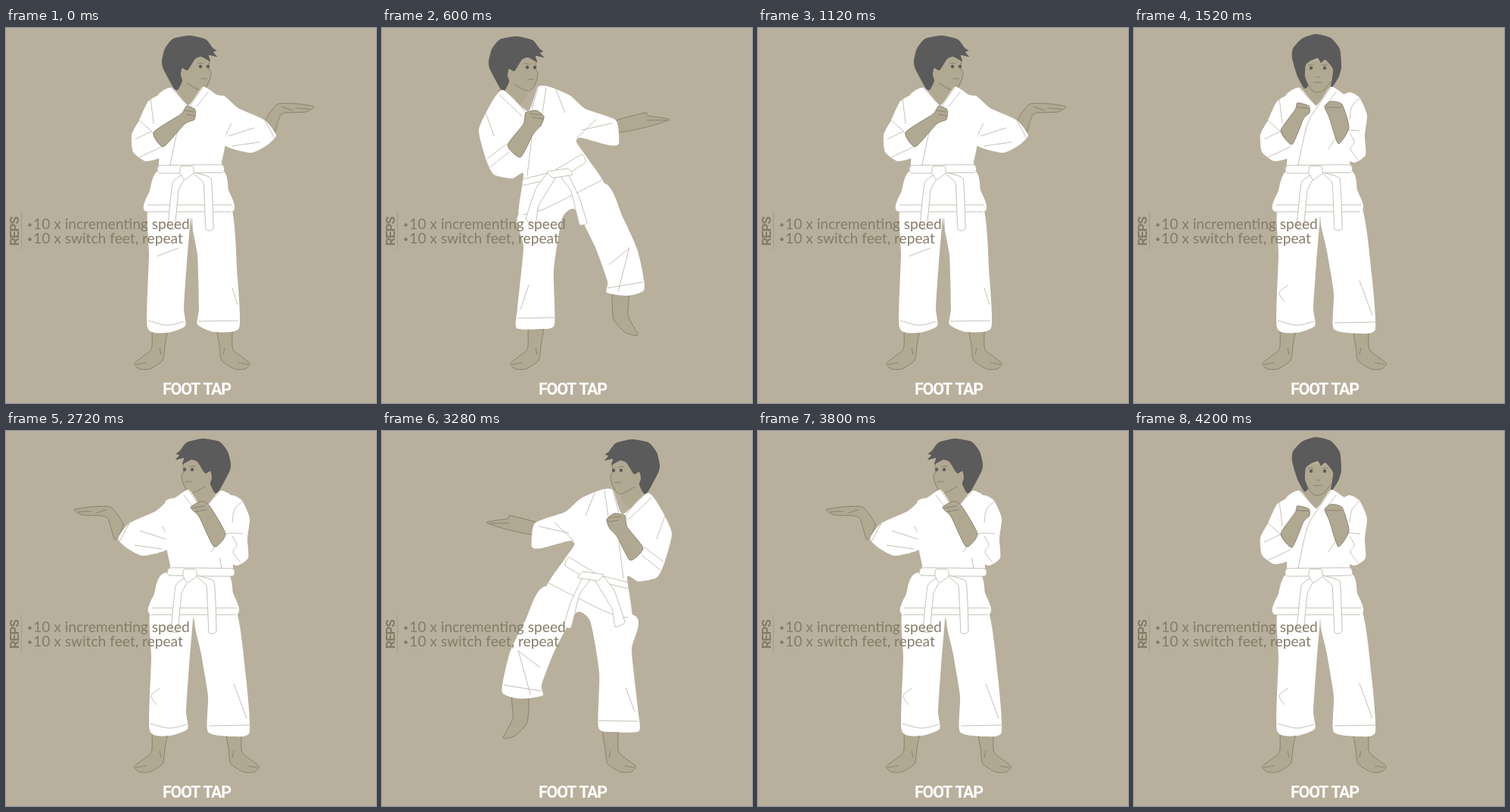
An HTML page with a canvas that plays this animation: 489 by 496 pixels, repeating every 5.64 s.

```html
<!DOCTYPE html>
<html lang="en">
<head>
<meta charset="utf-8">
<title>Foot tap</title>
<style>
html, body { margin: 0; width: 100%; height: 100%; overflow: hidden; background: #b8b09c; }
canvas { display: block; }
</style>
</head>
<body>
<canvas id="stage" width="489" height="496"></canvas>
<script>
const ctx = document.getElementById('stage').getContext('2d');
const BG = '#b8b09c', SKIN = '#b1a892', INK = '#857c69', FOLD = '#bdb8ac', HAIR = '#5c5b5b', TEXT = '#857c68';
const LOOP = 5640;

function toPoints(s) {
  const n = s.split(' ').map(Number), pts = [];
  for (let i = 0; i < n.length; i += 2) pts.push([n[i], n[i + 1]]);
  return pts;
}

// Gently rounded curve through the points
function curve(s, closed, tight) {
  const p = toPoints(s), n = p.length, path = new Path2D();
  const at = i => closed ? p[(i + n) % n] : p[Math.max(0, Math.min(n - 1, i))];
  path.moveTo(...p[0]);
  for (let i = 0; i < (closed ? n : n - 1); i++) {
    const a = at(i - 1), b = at(i), c = at(i + 1), d = at(i + 2);
    path.bezierCurveTo(b[0] + (c[0] - a[0]) / tight, b[1] + (c[1] - a[1]) / tight,
      c[0] - (d[0] - b[0]) / tight, c[1] - (d[1] - b[1]) / tight, c[0], c[1]);
  }
  if (closed) path.closePath();
  return path;
}

const area = (fill, stroke, tight = 10) => s => {
  const path = curve(s, true, tight);
  return () => {
    ctx.fillStyle = fill;
    ctx.fill(path);
    if (stroke) { ctx.strokeStyle = stroke; ctx.stroke(path); }
  };
};
const lines = color => (...list) => {
  const paths = list.map(s => curve(s, false, 6));
  return () => { ctx.strokeStyle = color; paths.forEach(p => ctx.stroke(p)); };
};
const skin = area(SKIN, INK), bare = area(SKIN), cloth = area('#fff'),
  band = area('#fff', FOLD, 20), hair = area(HAIR), fold = lines(FOLD), ink = lines(INK);
const eyes = s => () => {
  ctx.fillStyle = HAIR;
  toPoints(s).forEach(([x, y]) => {
    ctx.beginPath();
    ctx.arc(x, y, 2.2, 0, 7);
    ctx.fill();
  });
};

const place = (dx, dy, sx, part) => () => {
  ctx.save();
  ctx.translate(dx, dy);
  ctx.scale(sx, 1);
  part();
  ctx.restore();
};
const move = (dx, part) => place(dx, 0, 1, part);
const mirror = (sum, part) => place(sum, 0, -1, part);
const group = (...parts) => () => parts.forEach(p => p());

const profile = group(
  bare('232 60 256 80 256 90 241 104 219 82'),
  bare('236 42 268 38 269 53 271 59 268 74 257 82 246 79 233 64'),
  ink('269 42 268 53 271 59 269 69 263 80 256 82 239 73', '257 67 266 67', '253 46 261 47'),
  eyes('257 51 267 51'),
  hair('222 80 214 66 207 52 206 43 210 27 221 14 243 10 264 15 273 26 278 30 274 32 279 38 268 36 270 44 258 38 250 41 240 56 233 53 231 62 233 70 227 82'));
const frontHead = group(
  bare('225 72 261 72 262 82 241 104 219 82'),
  bare('226 46 262 46 261 66 252 81 243 85 235 82 227 70'),
  ink('227 70 235 82 243 85 252 81 260 70', '237 72 249 72', '241 65 246 65', '230 49 238 49', '248 49 256 49'),
  eyes('234 53 252 53'),
  hair('225 80 216 64 209 40 210 27 222 14 240 8 260 13 272 28 274 52 270 66 260 80 263 55 253 42 247 46 243 40 234 43 227 49 226 64 230 76'));

const foot = group(
  skin('194 396 192 425 170 443 176 451 190 451 207 440 210 420 213 396'),
  ink('203 423 205 432', '172 445 185 443'));
const hangingFoot = skin('305 350 306 385 322 403 338 406 325 380 326 350');

const legL = group(
  cloth('191 236 191 300 189 396 215 403 239 394 237 370 241 310 246 250 246 236'),
  fold('190 387 215 393 238 388'));
const knee = fold('204 340 192 350 199 362');
const legR = group(
  cloth('246 240 255 295 264 350 264 398 298 404 319 398 314 325 300 236'),
  fold('265 390 319 389', '298 334 315 380', '246 250 247 280'));
const legNarrow = group(
  cloth('245 240 253 300 255 370 253 392 275 402 308 397 306 330 297 236'),
  fold('254 388 307 387', '299 344 306 366', '199 302 228 291', '246 252 247 280'));

const skirt = group(
  cloth('203 188 190 215 186 243 298 243 294 214 285 188'),
  fold('187 234 299 234', '186 243 298 243'));
const chest = group(
  cloth('219 79 200 90 198 130 204 150 202 180 206 190 285 190 285 178 290 152 292 95 278 88 260 78 241 102'),
  fold('260 79 244 102 229 128 217 181', '219 80 241 103', '267 85 252 104'));
const waist = band('203 182 285 181 286 191 203 192');
const knot = group(
  band('231 195 220 205 214 264 223 265 228 215 236 199'),
  band('246 191 271 199 274 265 264 266 261 205'),
  band('231 183 247 183 248 192 236 201 230 192'));

const sleeveL = group(
  cloth('206 88 188 97 176 122 166 141 168 164 184 176 203 172 220 158 225 100'),
  fold('206 157 176 171', '176 122 196 140', '191 93 195 126', '171 147 192 137'));
const sleeveR = group(
  cloth('298 85 312 92 322 115 319 142 320 168 305 178 284 169 271 160 280 150 278 100'),
  fold('271 160 289 137 313 136', '299 139 305 151 300 160 310 174', '312 93 302 104 299 121'));
const sleeveOut = group(
  cloth('285 90 307 106 342 122 357 142 345 155 325 165 300 160 286 150'),
  fold('288 147 298 126', '294 143 328 132', '342 122 355 146', '299 156 335 151'));
const hand = group(
  skin('342 124 358 101 382 100 407 104 396 111 364 114 353 144'),
  ink('364 104 379 109', '383 106 402 107'));

const right = group(
  profile, foot, mirror(492, foot), move(-2, legL), legNarrow, skirt,
  hand, sleeveOut, chest, sleeveL, waist, knot,
  skin('195 138 231 114 239 103 250 108 249 121 236 127 208 157'),
  ink('235 109 248 111', '238 114 249 116'));

const front = group(
  frontHead, foot, mirror(503, foot), legL, knee, legR, move(1, skirt),
  chest, move(1, sleeveL), move(-14, sleeveR), waist, move(1, knot),
  skin('194 136 213 108 216 99 231 103 232 112 224 120 209 154'),
  skin('252 104 260 97 275 101 284 132 270 153 258 118'),
  ink('215 105 231 106', '254 105 274 105'));

const left = group(
  mirror(503, profile), foot, mirror(504, foot), move(1, legL), knee, move(3, legR), move(6, skirt),
  mirror(497, hand), mirror(505, sleeveOut), mirror(502, chest), sleeveR, mirror(502, waist), move(4, knot),
  skin('244 101 258 93 269 99 290 136 275 153 255 113'),
  ink('246 102 263 99', '249 107 266 104'));

const tapHead = place(-65, 1, 1, profile);
const tapPants = group(
  cloth('182 245 187 290 179 370 178 397 210 398 228 392 227 320 238 252 255 240 281 288 298 335 297 350 325 354 347 345 338 295 318 250 292 205'),
  fold('179 384 228 383', '298 344 345 336', '183 372 194 340', '300 313 327 291', '327 290 312 349'));
const tapHand = group(
  skin('308 123 348 112 352 116 380 121 350 131 311 138'),
  ink('350 122 377 122'));
const tapTop = group(
  cloth('160 82 144 100 128 135 138 175 148 194 172 199 187 193 181 248 215 248 258 230 295 210 270 170 257 151 262 145 300 155 313 153 309 122 269 107 248 89 222 78 206 78 193 110'),
  fold('165 82 190 112', '155 88 185 117', '206 78 198 108', '217 79 210 126', '198 145 192 195', '186 247 215 239 291 201',
    '137 112 148 143', '165 153 139 173', '143 184 168 164', '230 82 242 112', '258 145 283 121', '264 135 304 126'),
  band('187 200 225 190 264 167 269 178 240 195 187 208'),
  band('219 192 204 211 190 253 203 259 207 235 229 198'),
  band('244 190 261 225 271 258 261 260 250 216 237 198'),
  band('218 190 246 186 252 194 226 198'),
  skin('166 155 187 127 190 112 204 109 214 117 210 129 200 140 183 171'),
  ink('195 113 211 115', '198 118 213 120'));

const rightTap = group(tapHead, foot, hangingFoot, tapPants, tapHand, tapTop);
const leftTap = group(
  mirror(508, tapHead), mirror(505, foot), mirror(498, hangingFoot), place(530, 0, -1.07, tapPants),
  mirror(518, tapHand), mirror(511, tapTop));

// Each pose holds until its end time
const schedule = [
  [600, right], [720, rightTap], [1000, right], [1120, rightTap], [1520, right], [2720, front],
  [3280, left], [3400, leftTap], [3680, left], [3800, leftTap], [4200, left], [LOOP, front]
];

function label(text, x, y, font, color, spacing = 0) {
  ctx.font = font;
  ctx.fillStyle = color;
  ctx.letterSpacing = spacing + 'px';
  ctx.fillText(text, x, y);
}

function captions() {
  [['10 x incrementing speed', 266], ['10 x switch feet, repeat', 285]].forEach(([text, y]) => {
    ctx.fillStyle = TEXT;
    ctx.beginPath();
    ctx.arc(31.5, y - 5.5, 2.3, 0, 7);
    ctx.fill();
    label(text, 36, y, '19.2px Lato, sans-serif', TEXT);
  });
  ctx.fillStyle = '#a59d89';
  ctx.fillRect(20, 243, 1, 51);
  ctx.save();
  ctx.translate(16.5, 288);
  ctx.rotate(-Math.PI / 2);
  label('REPS', 0, 0, 'bold 17px Roboto, sans-serif', TEXT, -1);
  ctx.restore();
  label('FOOT TAP', 207, 485, 'bold 21.5px Roboto, sans-serif', '#fff', -1.2);
}

const start = performance.now();
function frame() {
  const t = (performance.now() - start) % LOOP;
  ctx.fillStyle = BG;
  ctx.fillRect(0, 0, 489, 496);
  ctx.lineWidth = 0.9;
  ctx.lineJoin = 'round';
  schedule.find(([end]) => t < end)[1]();
  captions();
  requestAnimationFrame(frame);
}
frame();
</script>
</body>
</html>
```
